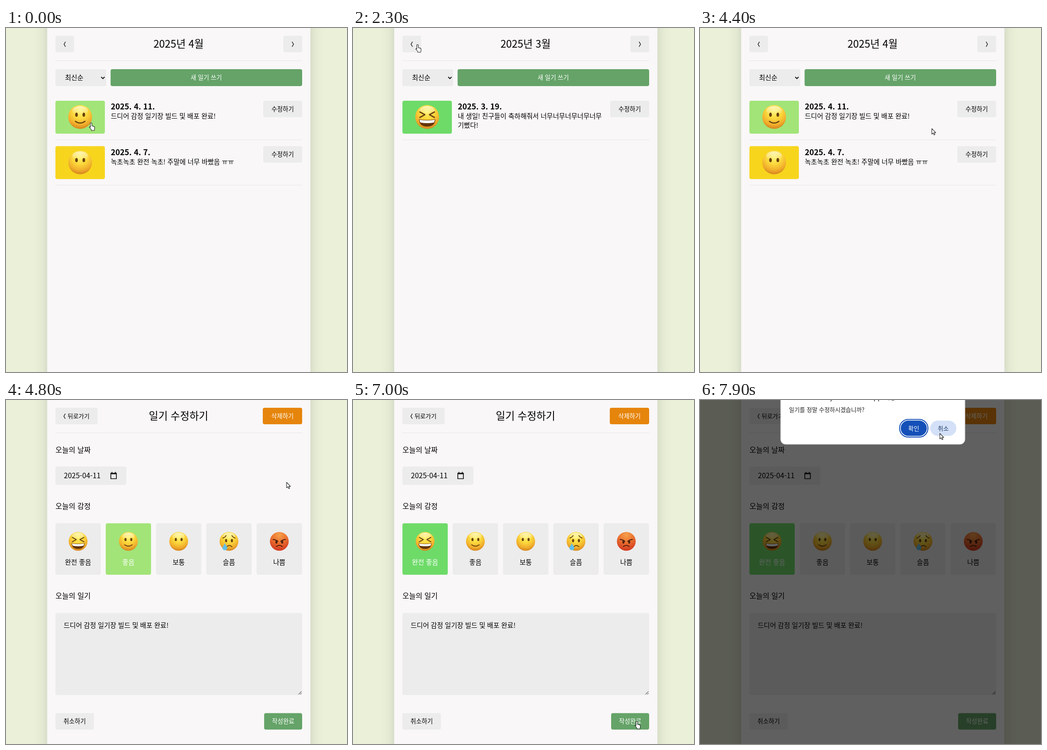
These frames come from a looping animation (745x752 px, 8000 ms). An HTML page:

```html
<!DOCTYPE html>
<html lang="ko">
<head>
<meta charset="utf-8">
<title>감정 일기장</title>
<style>
  html, body { margin: 0; width: 100%; height: 100%; overflow: hidden; background: #ebf1d8; }
  svg { display: block; width: 745px; height: 752px; }
  text { font-family: "Noto Sans CJK KR", "Noto Sans CJK", "Noto Sans CJK JP", sans-serif; }
</style>
</head>
<body>
<svg id="stage" viewBox="0 0 745 752" xmlns="http://www.w3.org/2000/svg">
  <defs>
    <filter id="soft" x="-20%" y="-20%" width="140%" height="140%"><feGaussianBlur stdDeviation="14.5"/></filter>
    <radialGradient id="yellow" cx=".5" cy=".26" r=".76">
      <stop offset="0" stop-color="#fff36b"/><stop offset=".42" stop-color="#fbd83c"/>
      <stop offset=".75" stop-color="#f1ae2c"/><stop offset="1" stop-color="#d27f1c"/>
    </radialGradient>
    <radialGradient id="red" cx=".5" cy=".16" r=".85">
      <stop offset="0" stop-color="#f5a04c"/><stop offset=".45" stop-color="#ec7431"/>
      <stop offset="1" stop-color="#d0361f"/>
    </radialGradient>
    <linearGradient id="gloss" x2="0" y2="1">
      <stop offset="0" stop-color="#fff" stop-opacity=".6"/><stop offset="1" stop-color="#fff" stop-opacity="0"/>
    </linearGradient>
    <g id="ball"><circle r="26" fill="url(#yellow)"/><ellipse cy="-14" rx="17" ry="10" fill="url(#gloss)"/></g>
    <g id="eyes"><ellipse cx="-8" cy="-5" rx="2.9" ry="4.5"/><ellipse cx="8" cy="-5" rx="2.9" ry="4.5"/></g>
    <g id="great">
      <use href="#ball"/>
      <path d="M-16-11L-5-5L-16 1M16-11L5-5L16 1" fill="none" stroke="#69400f" stroke-width="2.6" stroke-linecap="round" stroke-linejoin="round"/>
      <path d="M-18 5Q0 8 18 5Q17 21 0 21Q-17 21-18 5Z" fill="#643409"/>
      <path d="M-17 6Q0 9 17 6L15 12Q0 15-15 12Z" fill="#fff"/>
    </g>
    <g id="good">
      <use href="#ball"/><use href="#eyes" fill="#69400f"/>
      <path d="M-10.5 9.5Q0 17 10.5 9.5" fill="none" stroke="#69400f" stroke-width="2.4" stroke-linecap="round"/>
    </g>
    <g id="okay"><use href="#ball"/><use href="#eyes" fill="#69400f"/></g>
    <g id="sad">
      <use href="#ball"/><use href="#eyes" y="3" fill="#69400f"/>
      <path d="M-17-9Q-11-11-8-16M17-9Q11-11 8-16M-6 15Q1 8 8 15" fill="none" stroke="#69400f" stroke-width="2.3" stroke-linecap="round"/>
      <path d="M-12 4C-9 11-4 14-5 19A6.6 6.6 0 0 1-18 19C-18 14-13 11-12 4Z" fill="#62bfe8"/>
    </g>
    <g id="bad">
      <circle r="26" fill="url(#red)"/><use href="#eyes" y="7" fill="#51200e"/>
      <path d="M-17-5Q-10-5-4 0M17-5Q10-5 4 0M-8 14Q0 8 8 14" fill="none" stroke="#51200e" stroke-width="2.6" stroke-linecap="round"/>
    </g>
  </defs>
  <rect x="90" y="-60" width="575" height="872" fill="#64646f" opacity=".27" filter="url(#soft)"/>
  <rect x="90" width="575" height="752" fill="#f9f7f8"/>
  <g id="list"></g>
  <g id="edit"></g>
  <rect id="shade" width="745" height="752" opacity=".61"/>
  <g id="dialog"></g>
  <g id="pointer" stroke="#222" stroke-width="1.1" stroke-linejoin="round" fill="#fff">
    <path id="hand" d="M-1.6 1Q0-.6 1.6 1V7L7 8.4L7.8 11L7 17H.4V15L-4 10L-2.8 9L-1.6 10Z"/>
    <path id="arrow" d="M0 0V12L2.8 9.6L4.8 13.8L6.8 12.9L4.9 8.9H8.6Z"/>
  </g>
</svg>
<script>
const $ = id => document.getElementById(id);
const LOOP = 8000, STEP = 100;
const GRAY = '#ececec', GREEN = '#65a368', ORANGE = '#e6850c', BLUE = '#1450b8';
const moodColor = { great: '#6edb69', good: '#a2e478', okay: '#f7d51d' };

const box = (x, y, w, h, fill, r = 4, extra = '') =>
  `<rect x="${x}" y="${y}" width="${w}" height="${h}" rx="${r}" fill="${fill}" ${extra}/>`;
// y is the optical middle of the line
const label = (str, x, y, size, { anchor = 'start', weight = 400, fill = '#000', extra = '' } = {}) =>
  `<text x="${x}" y="${y + size * .37}" font-size="${size}" text-anchor="${anchor}" font-weight="${weight}" fill="${fill}" ${extra}>${str}</text>`;
const button = (str, x, y, w, bg = GRAY, fill = '#000') =>
  box(x, y, w, 36, bg) + label(str, x + w / 2, y + 18, 13.3, { anchor: 'middle', fill, weight: 500 });
const face = (name, x, y, scale = 1) => `<use href="#${name}" transform="translate(${x} ${y}) scale(${scale})"/>`;
const rule = y => `<rect x="108" y="${y}" width="539" height="1" fill="#e8e6e7"/>`;
const stroke = (d, width = 1.4) => `<path d="${d}" fill="none" stroke="#111" stroke-width="${width}"/>`;
const chevron = (x, dir) => stroke(`M${x} 30l${dir * 3.2} 5.5l${-dir * 3.2} 5.5`);
const title = str => label(str, 377, 35, 22.4, { anchor: 'middle' }) + rule(71);

function entry(row, mood, date, lines) {
  const y = 159 + row * 99.3;
  return box(108, y, 108, 72, moodColor[mood]) + face(mood, 162, y + 35.5) +
    label(date, 229, y + 13, 17, { weight: 700 }) +
    lines.map((line, i) => label(line, 229, y + 34 + i * 19.5, 14.5)).join('') +
    button('수정하기', 562, y, 85) + rule(Math.round(y + 85));
}

const note = '드디어 감정 일기장 빌드 및 배포 완료!';
const months = {
  april: title('2025년 4월') +
    entry(0, 'good', '2025. 4. 11.', [note]) +
    entry(1, 'okay', '2025. 4. 7.', ['녹초녹초 완전 녹초! 주말에 너무 바빴음 ㅠㅠ']),
  march: title('2025년 3월') +
    entry(0, 'great', '2025. 3. 19.', ['내 생일! 친구들이 축하해줘서 너무너무너무너무너무', '기뻤다!'])
};

$('list').innerHTML =
  box(108, 17, 40.5, 36, GRAY) + chevron(130, -1) +
  box(606, 17, 41, 36, GRAY) + chevron(625, 1) +
  box(108, 90, 111, 37, GRAY) + label('최신순', 129, 108.5, 14.5) + stroke('M208 107l3.7 3.7l3.7-3.7', 1.9) +
  box(228.5, 90, 418.5, 37, GREEN) + label('새 일기 쓰기', 437.5, 108.5, 13.3, { anchor: 'middle', fill: '#fff', weight: 500 }) +
  Object.entries(months).map(([id, html]) => `<g id="${id}">${html}</g>`).join('');

const heading = (word, y) => label('오늘의 ' + word, 108, y, 15.8, { weight: 500 });
const moodNames = { great: '완전 좋음', good: '좋음', okay: '보통', sad: '슬픔', bad: '나쁨' };
const moodCards = Object.entries(moodNames).map(([mood, name], i) => {
  const x = 108 + i * 109.9, mid = x + 49.5;
  return box(x, 269.5, 99, 112.5, GRAY, 4, `id="card-${mood}"`) + face(mood, mid, 309, .79) +
    label(name, mid, 354.5, 14.5, { anchor: 'middle', weight: 500, extra: `id="name-${mood}"` });
}).join('');

$('edit').innerHTML = title('일기 수정하기') +
  box(108, 17, 92, 36, GRAY) + chevron(129.6, -1) + label('뒤로가기', 134.5, 35, 13, { weight: 500 }) +
  button('삭제하기', 561, 17, 86, ORANGE, '#fff') +
  heading('날짜', 109) + box(108, 145.5, 155, 40, GRAY) + label('2025-04-11', 126.5, 165.5, 15.6) +
  stroke('M229 160h12.2v12h-12.2zM229 161.5h12.2M231.5 157v3m7.2 0v-3', 1.7) +
  heading('감정', 232) + moodCards +
  heading('일기', 428.5) + box(108, 465.5, 539, 179.5, GRAY) + label(note, 126, 493, 14.5) +
  stroke('M639 643.5l6.5-6.5m-2.5 6.5l2.5-2.5', 1) +
  button('취소하기', 108, 684.5, 84) + button('작성완료', 564, 684.5, 83, GREEN, '#fff');

$('dialog').innerHTML =
  box(176, -40, 403, 137, '#fff', 11, 'stroke="#bbb"') +
  label('emotion-diary-one.vercel.app 내용:', 194, -6, 14.6, { weight: 500, fill: '#222' }) +
  label('일기를 정말 수정하시겠습니까?', 194.5, 21.5, 12.7, { fill: '#222' }) +
  box(436, 42.5, 62, 38.5, 'none', 19, `stroke="${BLUE}" stroke-width="2"`) +
  box(438.5, 45, 57, 33.5, BLUE, 16.7) + label('확인', 467, 62, 13, { anchor: 'middle', fill: '#fff' }) +
  box(503, 45, 57, 33.5, '#d3e0f7', 16.7) + label('취소', 531.5, 62, 13, { anchor: 'middle', fill: '#1d3a66' });

// Pointer moves; it rests between them
const moves = [
  { from: 0, to: 0, x: 186, y: 207, hand: true },
  { from: 0, to: 400, x: 460, y: 305 },
  { from: 400, to: 600, x: 416, y: 336 },
  { from: 700, to: 1600, x: 152, y: 64 },
  { from: 1700, to: 1900, x: 141, y: 36, hand: true },
  { from: 2300, to: 2500, x: 674, y: 60 },
  { from: 2600, to: 2900, x: 638, y: 35, hand: true },
  { from: 3400, to: 3500, x: 627, y: 48, hand: true },
  { from: 3700, to: 4100, x: 144, y: 215, hand: true },
  { from: 4100, to: 4300, x: 400, y: 260 },
  { from: 4300, to: 4500, x: 613, y: 180, hand: true },
  { from: 4800, to: 4900, x: 588, y: 188 },
  { from: 5000, to: 5300, x: 362, y: 314, hand: true },
  { from: 5500, to: 5800, x: 160, y: 335, hand: true },
  { from: 6000, to: 6300, x: 614, y: 713, hand: true },
  { from: 6600, to: 6900, x: 620, y: 702, hand: true },
  { from: 7600, to: 7800, x: 514, y: 58 },
  { from: 7800, to: 7900, x: 524, y: 73 }
];

function pointerAt(t) {
  const i = moves.findLastIndex(m => m.from <= t && (m.from < t || m.to === 0));
  const b = moves[i], a = moves[Math.max(0, i - 1)];
  const k = b.to > b.from ? Math.min(1, (t - b.from) / (b.to - b.from)) : 1;
  return { x: a.x + (b.x - a.x) * k, y: a.y + (b.y - a.y) * k, hand: b.hand && k === 1 };
}

const show = (id, on) => $(id).setAttribute('display', on ? 'inline' : 'none');

function draw(t) {
  const editing = t >= 4700, asking = t >= 7100;
  const march = t >= 2100 && t < 3100;
  show('list', !editing);
  show('edit', editing);
  show('march', march);
  show('april', !march);

  const mood = t < 5900 ? 'good' : 'great';
  for (const name of ['good', 'great']) {
    $('card-' + name).setAttribute('fill', name === mood ? moodColor[name] : GRAY);
    $('name-' + name).setAttribute('fill', name === mood ? '#fff' : '#000');
  }

  show('shade', asking);
  show('dialog', asking);
  const left = (1 - Math.min(1, Math.max(0, (t - 7100) / 200))) ** 2;
  $('dialog').setAttribute('opacity', 1 - .62 * left);
  $('dialog').setAttribute('transform', `translate(0 ${-11 * left})`);

  const p = pointerAt(t);
  const hand = p.hand && t < 7200 && (t < 4700 || t > 4900);
  $('pointer').setAttribute('transform', `translate(${p.x} ${p.y})`);
  show('hand', hand);
  show('arrow', !hand);
}

const start = performance.now();
function tick() {
  const t = (performance.now() - start) % LOOP;
  draw(Math.floor(t / STEP) * STEP);
  requestAnimationFrame(tick);
}
tick();
</script>
</body>
</html>
```
